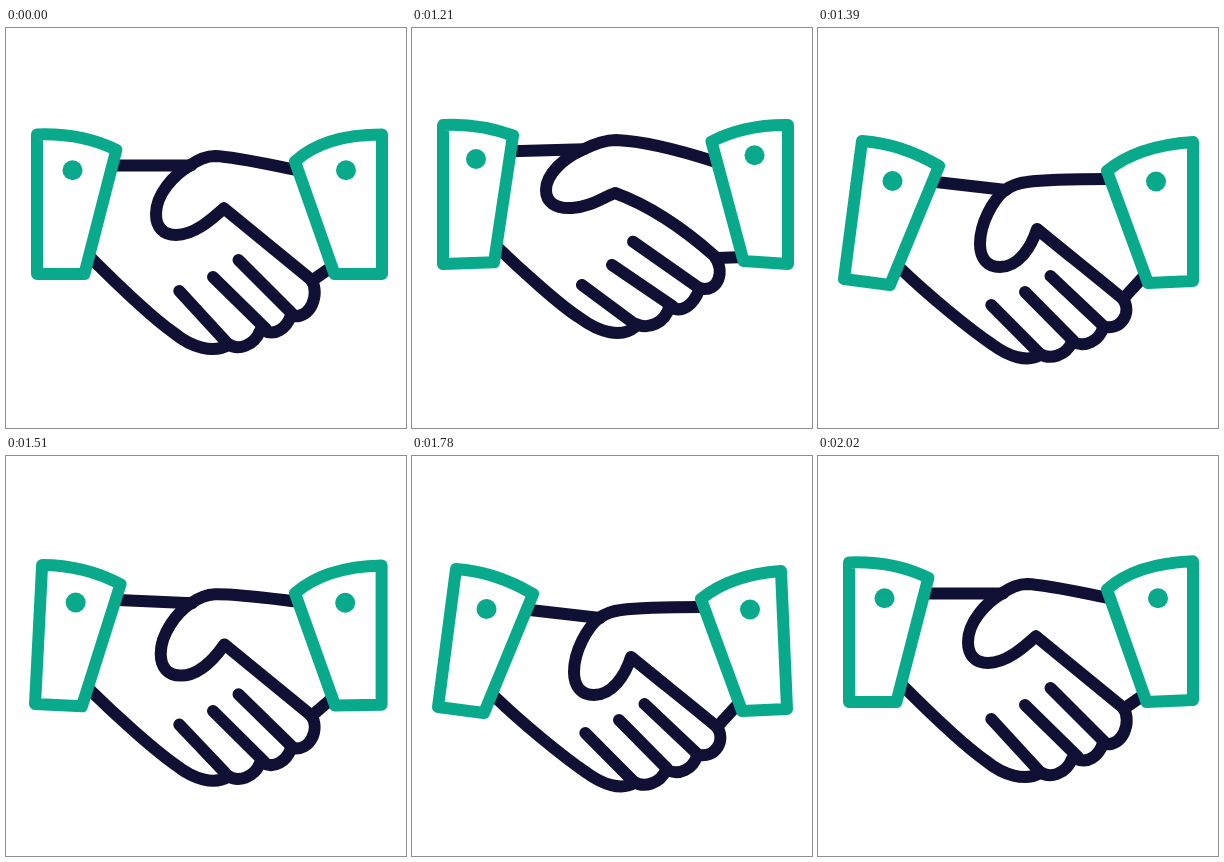
These frames come from a looping animation (400 by 400 pixels, 2050 ms). An HTML page:

```html
<!DOCTYPE html>
<html lang="en">
<head>
<meta charset="utf-8">
<title>Handshake</title>
<style>
  html, body { margin: 0; width: 100%; height: 100%; overflow: hidden; background: #fff; }
  svg { display: block; width: 100vw; height: 100vh; }
  path { fill: none; stroke-width: 12; stroke-linecap: round; stroke-linejoin: round; }
  .hand { stroke: #0f1033; }
  .cuff { stroke: #08aa8b; fill: #fff; }
  .button { stroke: #08aa8b; stroke-width: 20; }
</style>
</head>
<body>
<svg id="stage" viewBox="0 0 400 400"></svg>
<script>
const LOOP = 2050, START = 1000, STEP = 30;

// Key times in steps after START, and the pose held at each one.
const KEYS = [
  [0, "rest"], [7, "up"], [13, "down"], [20, "rest"], [26, "downAgain"], [33, "settle"]
];

// Every pose of a part has the same path commands, so its points can be blended.
const parts = [
  { kind: "hand", // left sleeve line
    rest: "M108 137.6L185 137.6",
    up: "M99 123.3L172 121.3",
    down: "M118 154L188 162" },
  { kind: "hand", // right arm, thumb and index finger
    rest: "M291 142C265 137 230 129 209 128C200 128 190 133 183 138C168 147 150 166 150 186C150 199 157 207 170 207C188 207 205 192 218 180.3C247 204 276 228 305.5 252C314 266 305 291 286.5 288",
    up: "M304 134C270 123 230 113 204 112C194 112 180 117 170 122C152 130 134 146 134 162C134 174 143 181 160 180C178 179 190 170 203 165C236 177 272 201 302.5 228C313.5 244 306 264 289 260.5",
    down: "M291 151C265 151 230 151 209 154C200 155 193 158 187 162C175 172 162 195 162 216C162 231 170 239 182 239C200 239 213 220 219 201C247 224 276 247 305 271C314 284 304 302 286.5 299" },
  { kind: "hand", // finger gaps
    rest: "M232.5 232L286.5 286M207 249L260 301M173.3 263L222 316",
    up: "M221 213.7L288 260.7M200 237L261 278.5M170 257L224 297",
    down: "M232.5 248L286.5 299M207 264L255.5 313M173.3 277L222 326" },
  { kind: "hand", // middle and ring fingertips
    rest: "M285 287C281 300 269 309 257 302M254 303C248 318 232 323 222 316",
    up: "M287 262C282 276 270 286.5 258 278.5M257.5 278C253 296 236 301.5 224 296",
    down: "M285 300C281 313 267 320 255 314M254 314C248 328 232 332 222 326" },
  { kind: "hand", // palm edge
    rest: "M84 229C110 255 148 291 168 305C185 319 207 326 222 317",
    up: "M83 217C110 243 150 279 168 290C188 305 210 310 223 299",
    down: "M82 240C110 267 150 300 175 317C190 328 209 335 222 327" },
  { kind: "hand", // right wrist
    rest: "M305.5 253L327 238",
    up: "M304 230L334 229",
    down: "M305 271L327 247" },
  { kind: "cuff",
    rest: "M31 106.5C60 105.5 88 111 110.3 122L78.4 246L31 246Z",
    up: "M31 97C56 95.5 80 100 101 107.5L82 234.3L31 236Z",
    down: "M44 113C73 115 99 125 121 138L72 257L26 251Z" },
  { kind: "cuff",
    rest: "M289 133.5C310 114 340 106.5 376 106.5L376 246L328.5 246Z",
    up: "M299.5 113.5C325 100.5 350 96.5 376 97L376 236L331.5 233Z",
    down: "M289 143C312 124 345 116 375 114L375 253L330 255Z",
    downAgain: "M289 143C312 124 342 117 369 115L375 253L330 255Z",
    settle: "M289 133.5C310 114.5 342 106.5 375 105.3L375 244L328.5 246Z" },
  { kind: "button",
    rest: "M66.5 142.3L66.5 142.3",
    up: "M64 131L64 131",
    down: "M74.5 153L74.5 153" },
  { kind: "button",
    rest: "M340 142.3L340 142.3",
    up: "M342.5 127.3L342.5 127.3",
    down: "M338 153.5L338 153.5" }
];

const stage = document.getElementById("stage");
for (const part of parts) {
  part.downAgain ??= part.down;
  part.settle ??= part.rest;
  part.node = document.createElementNS("http://www.w3.org/2000/svg", "path");
  part.node.setAttribute("class", part.kind);
  stage.append(part.node);
}

const NUMBER = /[\d.]+/g;
const ease = p => p * p * (3 - 2 * p);

function blend(from, to, amount) {
  const ends = to.match(NUMBER);
  let i = 0;
  return from.replace(NUMBER, n => (+n + (ends[i++] - n) * amount).toFixed(2));
}

function draw(time) {
  const step = Math.max(0, Math.floor((time - START) / STEP));
  const next = KEYS.findIndex(([at]) => at > step);
  const [fromAt, from] = KEYS.at(next < 0 ? -1 : next - 1);
  const [toAt, to] = KEYS.at(next);
  const amount = next < 0 ? 1 : ease((step - fromAt) / (toAt - fromAt));
  for (const part of parts) part.node.setAttribute("d", blend(part[from], part[to], amount));
}

function tick() {
  draw(performance.now() % LOOP);
  requestAnimationFrame(tick);
}
tick();
</script>
</body>
</html>
```
